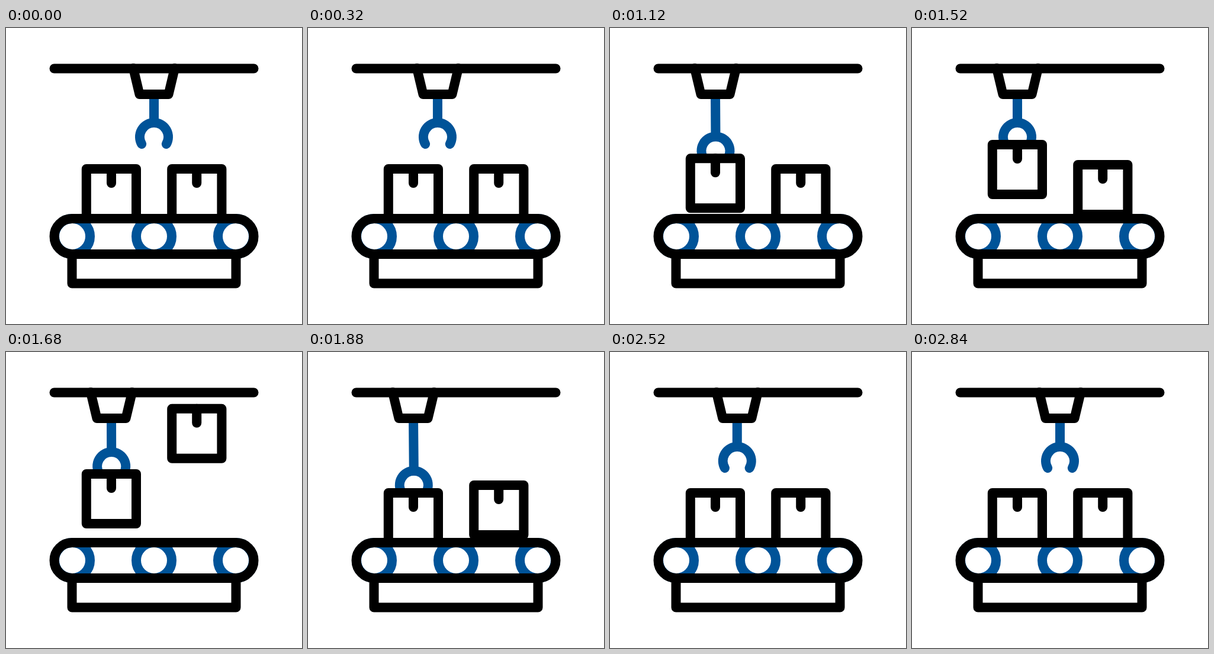
Animation of 500 by 500 pixels, one loop 3000 ms. Source, as an HTML page:

```html
<!DOCTYPE html>
<html lang="en">
<head>
<meta charset="utf-8">
<title>Conveyor</title>
<style>
  html, body { margin: 0; width: 100%; height: 100%; overflow: hidden; background: #fff; }
  svg { display: block; width: 100%; height: 100%; }
  .ink, .blue { fill: none; stroke: #000; stroke-width: 16; stroke-linecap: round; stroke-linejoin: round; }
  .blue { stroke: #005398; stroke-linecap: round; }
  .solid { fill: #fff; }
</style>
</head>
<body>
<svg viewBox="0 0 500 500">
  <g class="blue">
    <circle cx="112" cy="352" r="30"/>
    <circle cx="250" cy="352" r="30"/>
    <circle cx="388" cy="352" r="30"/>
  </g>
  <g class="ink">
    <path d="M111.5 382V431.5H388.5V382"/>
    <rect x="81.5" y="322" width="337" height="60" rx="30"/>
    <path d="M81.5 68.5H418.5"/>
  </g>
  <g class="blue">
    <path id="rod"/>
    <path id="claw" d="M229.2 196A24 24 0 1 1 270.8 196"/>
  </g>
  <path id="trolley" class="ink" d="M215 68L225.5 112H274.5L285 68"/>
  <g id="leftBox" class="ink">
    <path class="solid" d="M135.8 238H220V322H135.8Z"/>
    <path d="M178 238V262"/>
  </g>
  <g id="rightBox" class="ink">
    <path class="solid" d="M280.2 238H364.4V322H280.2Z"/>
    <path d="M322.2 238V262"/>
  </g>
</svg>
<script>
  const LOOP = 3000, TRAVEL = 72, DROP = 41;
  const get = id => document.getElementById(id);
  const rod = get('rod'), claw = get('claw'), trolley = get('trolley');
  const leftBox = get('leftBox'), rightBox = get('rightBox');

  // Smooth progress from 0 to 1 between two times.
  function ease(t, from, to) {
    const p = Math.min(1, Math.max(0, (t - from) / (to - from)));
    return p * p * (3 - 2 * p);
  }

  // Rise and fall between two times.
  function hop(t, from, to, height) {
    const mid = (from + to) / 2;
    return height * (ease(t, from, mid) - ease(t, mid, to));
  }

  const shift = (node, x, y) => node.setAttribute('transform', `translate(${x} ${y})`);

  function draw(t) {
    const x = -TRAVEL * (ease(t, 33, 667) - ease(t, 2200, 2833));
    const lift = DROP * (ease(t, 1000, 1267) - ease(t, 1600, 1867));
    const reach = DROP * (ease(t, 667, 1000) - ease(t, 1867, 2200))  - lift;
    const sway = 0.8 * reach / DROP;

    shift(trolley, x, 0);
    shift(claw, x + sway, reach);
    rod.setAttribute('d', `M${250 + x} 113L${250 + x + sway} ${160 + reach}`);
    shift(leftBox, 0, -lift);
    shift(rightBox, 0, -(hop(t, 1493, 1920, 148) + hop(t, 1920, 2246, 60) + hop(t, 2246, 2450, 20)));
  }

  function tick() {
    draw(performance.now() % LOOP);
    requestAnimationFrame(tick);
  }
  tick();
</script>
</body>
</html>
```
